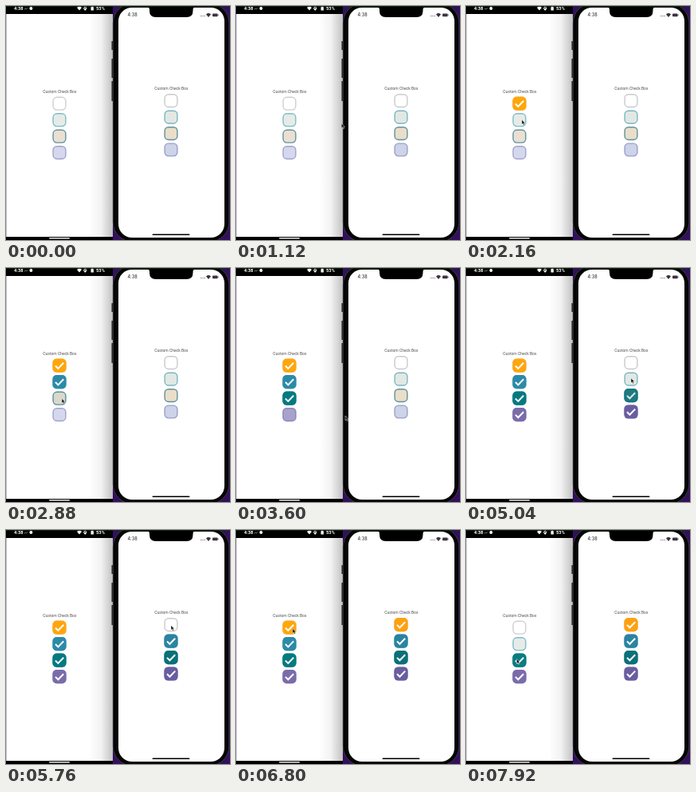
These frames come from a looping animation (281x293 px, 8 s). An HTML page:

```html
<!DOCTYPE html>
<html lang="en">
<head>
<meta charset="utf-8">
<title>Custom check boxes on two phones</title>
<style>
  html, body { margin: 0; width: 100%; height: 100%; overflow: hidden; background: #fff; }
  svg { display: block; width: 100vw; height: 100vh; }
  .title { font: 5px Roboto, Arial, sans-serif; fill: #505050; }
  .bar { font: 700 5.8px Roboto, Arial, sans-serif; fill: #fff; }
  .clock { font: 500 5.5px Inter, Arial, sans-serif; fill: #333; }
</style>
</head>
<body>
<svg viewBox="0 0 281 293">
  <defs>
    <linearGradient id="shade">
      <stop offset="0" stop-color="#000" stop-opacity="0"/>
      <stop offset=".5" stop-color="#000" stop-opacity=".05"/>
      <stop offset="1" stop-color="#000" stop-opacity=".24"/>
    </linearGradient>
    <g id="wifi"><path d="M-3-1.6Q0-4.2 3-1.6L0 2Z"/></g>
  </defs>

  <!-- left phone -->
  <rect width="281" height="293" fill="#fff"/>
  <path d="M.5 10V289" stroke="#b9b6c8"/>
  <rect x="104" y="10" width="30" height="279" fill="url(#shade)"/>
  <rect width="134" height="10"/>
  <rect y="289" width="134" height="4"/>
  <rect x="54" y="290" width="26" height="1.5" rx=".7" fill="#eee"/>
  <text class="bar" x="10" y="5.4">4:38</text>
  <path d="M23 4.2l1.5-1 1 .6 1.5-1.2" stroke="#aaa" stroke-width=".8" fill="none"/>
  <circle cx="31.4" cy="3" r="2" fill="#fff"/>
  <use href="#wifi" x="92" y="3.6" fill="#fff"/>
  <circle cx="99.3" cy="3" r="1.6" fill="none" stroke="#fff"/>
  <path d="M98.6 3h1.4v2.4h-1.4z" fill="#fff"/>
  <path d="M106.5 1.2h1v-.7h1.4v.7h1v4.4h-3.4z" fill="#fff"/>
  <text class="bar" x="113" y="5.4">53%</text>
  <text class="title" x="46.3" y="108.6">Custom Check Box</text>

  <!-- right phone -->
  <rect x="134" width="147" height="293" fill="#32105c"/>
  <path d="M132.5 44h2v11h-2zM132.5 66h2v24h-2zM132.5 94h2v25h-2z" fill="#222"/>
  <rect x="134.3" y="-3" width="145.5" height="298" rx="24" fill="#050505" stroke="#454548" stroke-width=".8"/>
  <rect x="141" y="2" width="133" height="288" rx="17" fill="#fff"/>
  <path d="M178 1.8Q180 2 180 4.5V6Q180 14 188 14H226.5Q234.5 14 234.5 6V4.5Q234.5 2 236.5 1.8Z"/>
  <path d="M0 .4H281" stroke="#0b3a12" stroke-width=".8"/>
  <text class="clock" x="152.5" y="13.3">4:38</text>
  <path d="M244 12.5H250" stroke="#777" stroke-width="1" stroke-dasharray="1 .7"/>
  <use href="#wifi" x="254" y="12" fill="#3c3340"/>
  <rect x="259" y="9.6" width="6.6" height="3.6" rx="1" fill="#3c3340"/>
  <path d="M266.3 10.6v1.6" stroke="#3c3340" stroke-width=".6"/>
  <rect x="183.5" y="285.4" width="47" height="1.6" rx=".8"/>
  <text class="title" x="186.3" y="105.4">Custom Check Box</text>

  <g id="boxes"></g>
  <path id="cursor" d="M0 0V5.8L1.4 4.6 2.4 6.8 3.5 6.3 2.5 4.2H4.3Z" fill="#111" stroke="#fff" stroke-width=".45"/>
</svg>
<script>
const LOOP = 8000, FADE = 500;
const NEVER = Infinity;

// x, y, fill, border, checked colour, time checked, time unchecked
const boxes = [
  [67, 122.2, '#ffffff', '#cfcfd3', '#ffa60c', 1450, 6850],
  [67, 142.7, '#e6ebe8', '#7dbcc6', '#2b8aa8', 2200, 7280],
  [67, 163.2, '#ebdfd3', '#62949b', '#047a80', 2800, 7880],
  [67, 183.6, '#d5d8ed', '#a0a3cd', '#7a6cab', 3350, NEVER],
  [207, 118.6, '#ffffff', '#cacace', '#ffa110', 5800, NEVER],
  [207, 139.1, '#e2e8e4', '#79b6c1', '#2a84a1', 5150, NEVER],
  [207, 159.6, '#e9dec9', '#62919a', '#0b707a', 4630, NEVER],
  [207, 180, '#cdd3e8', '#9a9dcb', '#695da1', 4060, NEVER]
];

// time, x, y of the pointer tip
const path = [
  [700, 286, 205], [1350, 71, 124], [1550, 71, 124], [2020, 70, 142.5],
  [2280, 70, 142.5], [2650, 70, 163], [2850, 70, 163], [3180, 70, 183],
  [3380, 70, 183], [3600, 137, 185], [3950, 207, 177], [4380, 207, 177],
  [4580, 207, 158], [4720, 207, 158], [5050, 207, 138], [5250, 207, 138],
  [5600, 207, 119.5], [5980, 207, 119.5], [6600, 71, 123.5], [6900, 71, 123.5],
  [7200, 70, 143], [7380, 70, 143], [7760, 63.5, 161.5], [8000, 63.5, 161.5]
];

const clamp = v => Math.max(0, Math.min(1, v));
const smooth = v => v * v * (3 - 2 * v);
const fade = (t, start) => smooth(clamp((t - start) / FADE));

const group = document.getElementById('boxes');
const cursor = document.getElementById('cursor');

group.innerHTML = boxes.map(([x, y, fill, border, on]) => `
  <g transform="translate(${x} ${y})">
    <rect x="-7.9" y="-7.9" width="15.8" height="15.8" rx="4.8" fill="${fill}" stroke="${border}" stroke-width="1.4"/>
    <rect class="on" x="-8.6" y="-8.6" width="17.2" height="17.2" rx="5" fill="${on}"/>
    <path class="tick" d="M-5 .3L-1.6 3.7 5.2-3.4" fill="none" stroke="#fff" stroke-width="2"/>
  </g>`).join('');

const fills = group.querySelectorAll('.on');
const ticks = group.querySelectorAll('.tick');

function pointer(t) {
  const i = path.findIndex(p => p[0] > t);
  if (i < 1) return path[0].slice(1);
  const [t0, x0, y0] = path[i - 1], [t1, x1, y1] = path[i];
  const k = smooth((t - t0) / (t1 - t0));
  return [x0 + (x1 - x0) * k, y0 + (y1 - y0) * k];
}

function draw(now) {
  const t = now % LOOP;
  boxes.forEach((box, i) => {
    const level = fade(t, box[5]) * (1 - fade(t, box[6]));
    fills[i].setAttribute('opacity', level);
    ticks[i].setAttribute('opacity', clamp(level * 2 - 1));
  });
  cursor.setAttribute('transform', `translate(${pointer(t)})`);
  requestAnimationFrame(draw);
}
draw(performance.now());
</script>
</body>
</html>
```
